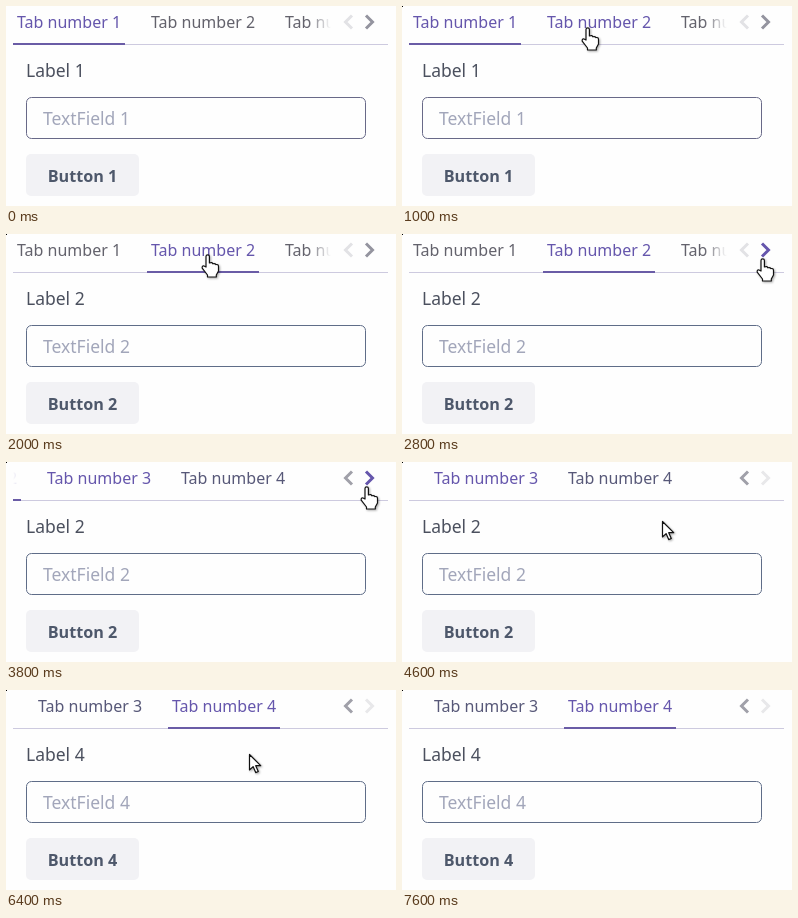
These frames come from a looping animation (390 px wide and 200 px high, 7800 ms). An HTML page:

```html
<!DOCTYPE html>
<html lang="en">
<head>
<meta charset="utf-8">
<title>Lazy tabs</title>
<style>
  html, body { margin: 0; width: 100%; height: 100%; overflow: hidden; background: #fefefe; }
  svg { display: block; width: 390px; height: 200px; font: 16px "Noto Sans", "Open Sans", sans-serif; }
  .content text { font-size: 17.5px; }
  .content .button { font-size: 16.2px; font-weight: 600; }
  .chevron { fill: none; stroke-width: 3; }
  .pointer { fill: #fff; stroke: #111; stroke-width: 1.2; stroke-linejoin: round;
             filter: drop-shadow(1px 1px 1px rgba(0, 0, 0, .35)); }
</style>
</head>
<body>
<svg viewBox="0 0 390 200">
  <defs>
    <linearGradient id="fade">
      <stop offset="0" stop-color="#fefefe" stop-opacity="0"/>
      <stop offset="1" stop-color="#fefefe"/>
    </linearGradient>
  </defs>
  <rect width="390" height="200" fill="#fefefe"/>
  <rect x="7" y="38" width="375" height="1" fill="#cdcadf"/>
  <g id="tabs"><rect id="underline" y="37" width="112" height="2" fill="#6a5ca6"/></g>
  <rect width="7" height="40" fill="#fefefe"/>
  <rect id="leftFade" width="23" height="36" fill="url(#fade)" transform="translate(30 0) scale(-1 1)"/>
  <rect x="302" width="23" height="36" fill="url(#fade)"/>
  <rect x="325" width="65" height="36" fill="#fefefe"/>
  <rect x="325" y="36" width="65" height="2" fill="#fefefe"/>
  <path id="prev" class="chevron" d="M346 9.5 339.5 16 346 22.5"/>
  <path id="next" class="chevron" d="M360 9.5 366.5 16 360 22.5"/>

  <g id="content" class="content">
    <text id="label" x="20" y="71" fill="#4b505e"></text>
    <rect id="field" x="20.5" y="91.5" width="339" height="41" rx="5" fill="#fefefe"/>
    <text id="placeholder" x="37" y="119" fill="#a2a6ba"></text>
    <rect x="20" y="148" width="113" height="42" rx="5" fill="#f2f2f5"/>
    <text id="button" class="button" x="76.5" y="176" text-anchor="middle" fill="#4e586b"></text>
  </g>

  <g id="loader" fill="none" stroke-width="2">
    <circle cx="194.5" cy="120.5" r="10.5" stroke="#e2e0ee"/>
    <path id="arc" d="M194.5 110a10.5 10.5 0 0 1 0 21" stroke="#6758ae"/>
  </g>

  <path id="arrow" class="pointer" d="M.5 .5V16l3.6-3.4 2.6 6 2.6-1.1-2.6-5.8h5z"/>
  <path id="hand" class="pointer" d="M5 13V2.5a1.7 1.7 0 0 1 3.4 0V9q2.8-1 3.4.8 2.4-.8 3 .8 2.7-.5 2.7 2V17l-2.2 4v2H6.5v-2L1.2 14.2Q.8 11.5 3 12z"/>
  <rect id="corner" width="1" height="1" fill="#000"/>
</svg>
<script>
const LOOP = 7800, STEP = 200, TAB_PITCH = 134;
const PURPLE = '#6556ac', GRAY = '#63626c', SLATE = '#575878';
const $ = id => document.getElementById(id);

// [start, shape, x, y]
const pointerSteps = [
  [0], [200, 'arrow', 150, 80], [400, 'arrow', 164, 89], [800, 'arrow', 174, 58],
  [1000, 'hand', 179, 21], [2000, 'hand', 195, 20], [2200, 'arrow', 236, 50],
  [2400, 'arrow', 290, 52], [2600, 'arrow', 336, 40], [2800, 'hand', 354, 24],
  [4200, 'hand', 359, 25], [4400, 'arrow', 325, 52], [4600, 'arrow', 260, 59],
  [4800, 'arrow', 214, 42], [5000, 'hand', 187, 15], [6200, 'arrow', 222, 44],
  [6400, 'arrow', 243, 64], [6600, 'arrow', 268, 112], [6800]
];
const scrollSteps = [[0, 0], [3200, 30], [3400, 112], [3600, 200], [3800, 238], [4000, 247]];
const pageSteps = [[0, 1], [1800, 2], [6000, 4]];

const at = (steps, t) => steps.findLast(s => s[0] <= t);
const within = (t, from, to) => t >= from && t < to;
const show = (id, on) => $(id).setAttribute('visibility', on ? 'visible' : 'hidden');
const move = (id, x, y = 0) => $(id).setAttribute('transform', `translate(${x} ${y})`);

const tabs = [1, 2, 3, 4].map(n => {
  const tab = document.createElementNS('http://www.w3.org/2000/svg', 'text');
  tab.setAttribute('x', 11 + (n - 1) * TAB_PITCH);
  tab.setAttribute('y', 22);
  tab.textContent = `Tab number ${n}`;
  return $('tabs').appendChild(tab);
});

function draw(t) {
  const page = at(pageSteps, t)[1];
  const scroll = at(scrollSteps, t)[1];
  const [, shape, x, y] = at(pointerSteps, t);
  const loading = within(t, 1200, 1800) || within(t, 5400, 6000);

  move('tabs', -scroll);
  $('underline').setAttribute('x', 7 + (page - 1) * TAB_PITCH);
  const colors = [
    t < 2000 ? PURPLE : GRAY,
    t >= 1000 ? PURPLE : GRAY,
    within(t, 3600, 5400) ? PURPLE : t < 3600 ? GRAY : SLATE,
    t >= 5000 ? PURPLE : SLATE
  ];
  tabs.forEach((tab, i) => tab.setAttribute('fill', colors[i]));
  show('leftFade', scroll > 0);
  $('prev').setAttribute('stroke', scroll ? '#a0a0a9' : '#e2e2e5');
  $('next').setAttribute('stroke',
    t >= 4000 ? '#e8e8ea' : t >= 2800 ? PURPLE : '#94949f');

  $('label').textContent = `Label ${page}`;
  $('placeholder').textContent = `TextField ${page}`;
  $('button').textContent = `Button ${page}`;
  $('field').setAttribute('stroke', page === 1 ? '#686988' : '#5f6d88');
  show('content', !loading);
  show('loader', loading);
  const turn = (t - (t < 3000 ? 1600 : 5400)) / 1000 * 360;
  $('arc').setAttribute('transform', `rotate(${turn} 194.5 120.5)`);

  for (const id of ['arrow', 'hand']) show(id, id === shape);
  if (shape) move(shape, x, y);
  show('corner', t >= 200);
}

const start = performance.now();
function tick() {
  const t = (performance.now() - start) % LOOP;
  draw(Math.floor(t / STEP) * STEP);
  requestAnimationFrame(tick);
}
tick();
</script>
</body>
</html>
```
